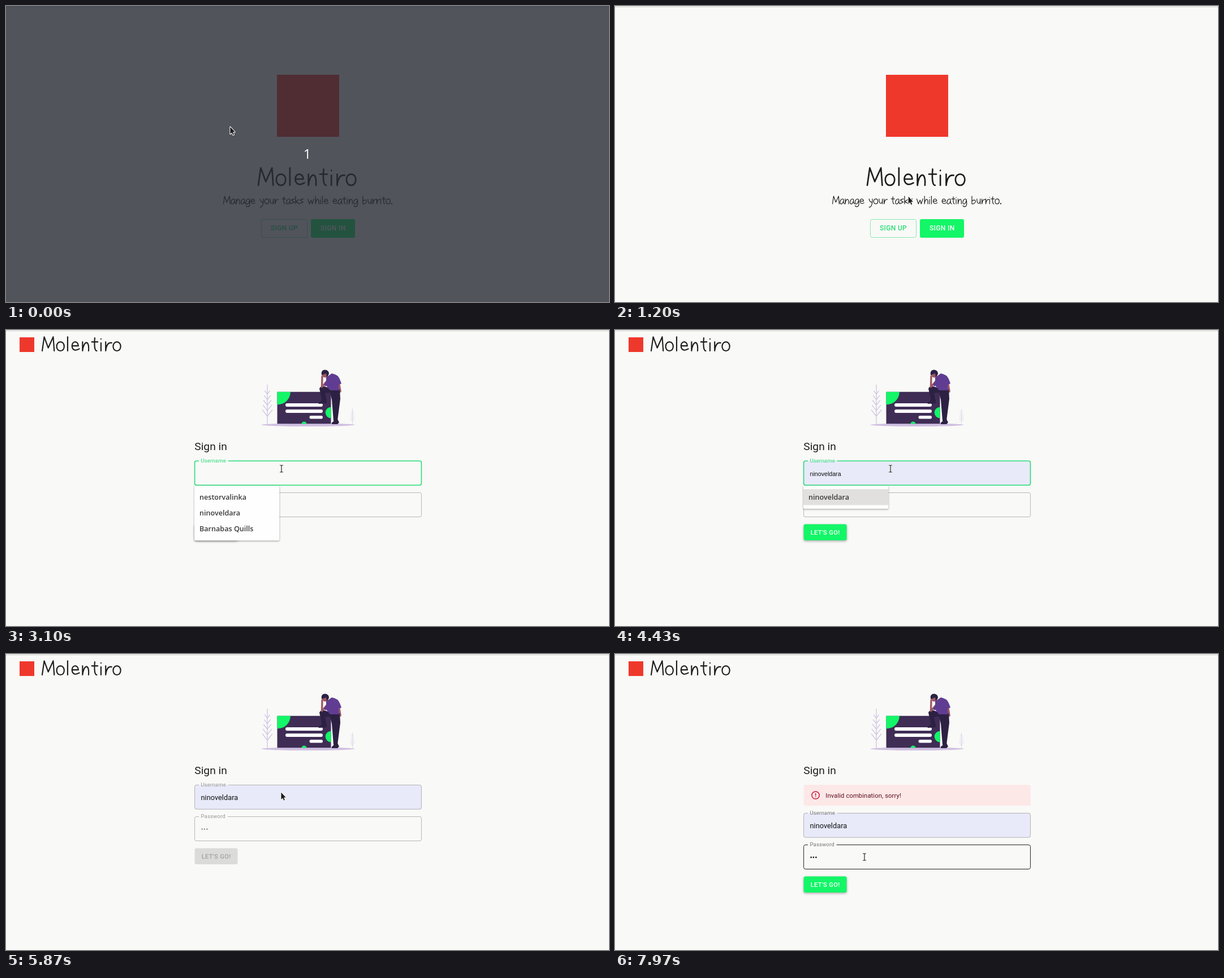
Write an HTML page with a canvas that moves like this. It is 1066 px wide and 525 px high and loops after 8000 ms.

```html
<!DOCTYPE html>
<html lang="en">
<head>
<meta charset="utf-8">
<title>Molentiro</title>
<style>
html, body { margin: 0; width: 100%; height: 100%; overflow: hidden; background: #f9f9f7; }
canvas { display: block; }
</style>
</head>
<body>
<canvas width="1066" height="525" aria-label="Molentiro sign-in demo"></canvas>
<script>
const LOOP = 8000, PAGE = '#f9f9f7', GREEN = '#13f667', FOCUS = '#2bdc78', RED = '#ef382c';
const APP = 'Molentiro', USER = 'ninoveldara';
const NAMES = ['nestorvalinka', USER, 'Barnabas Quills'];
const USER_KEYS = [3470, 3530, 3600, 3700, 3900], PASS_KEYS = [5030, 5100, 5270];
const SANS = 'Roboto, sans-serif', MENU = '"Open Sans", sans-serif';
const c = document.querySelector('canvas').getContext('2d');

const clamp = v => Math.max(0, Math.min(1, v));
const span = (t, a, b) => clamp((t - a) / (b - a));
const easeOut = p => 1 - (1 - p) ** 3;
const easeInOut = p => p * p * (3 - 2 * p);
const count = (keys, t) => keys.filter(k => k <= t).length;

function box(x, y, w, h, r, color, line) {
  c.beginPath();
  c.roundRect(x, y, w, h, r);
  if (color) { c.fillStyle = color; c.fill(); }
  if (line) { c.strokeStyle = line; c.lineWidth = 1; c.stroke(); }
}

function text(s, x, y, font, color, spacing = 0, align = 'left') {
  c.font = font;
  c.letterSpacing = spacing + 'px';
  c.textAlign = align;
  c.fillStyle = color;
  c.fillText(s, x, y);
}

function disc(x, y, r, color) {
  c.beginPath();
  c.arc(x, y, r, 0, 7);
  c.fillStyle = color;
  c.fill();
}

function shape(d, color) {
  c.fillStyle = color;
  c.fill(new Path2D(d));
}

function line(d, color, width) {
  c.strokeStyle = color;
  c.lineWidth = width;
  c.stroke(new Path2D(d));
}

function shadowed(draw, alpha, blur, dy) {
  c.save();
  c.shadowColor = `rgba(0,0,0,${alpha})`;
  c.shadowBlur = blur;
  c.shadowOffsetY = dy;
  draw();
  c.restore();
}

// Handwriting: single strokes on a baseline at 0
const bowl = 'M7-8C3-12-2-2 2 0C5 1 7-4 7-8', stem = 'M1-14V0', arch = 'C2-10 8-12 7 0';
const GLYPHS = {
  a: bowl + 'Q6-1 9 0', g: bowl + 'C8 0 8 5 4 5Q1 5 1 3',
  o: 'M4-9C-1-9-1 0 4 0C9 0 9-9 4-9', n: 'M1-9V0' + arch, h: stem + arch,
  e: 'M1-5H7C7-11-1-10 1-3Q3 1 8-2', y: 'M1-9Q2-3 6-3M7-9Q7 6 1 6',
  u: 'M1-9C1 2 7 2 7-9V0', r: 'M1-9V0Q2-9 7-8', t: 'M3-13Q2 0 5 0M0-9H6',
  s: 'M6-9Q-3-7 3-5T0-1', k: stem + 'M7-8L1-4Q5-3 8 0', l: stem,
  w: 'M0-9L3 0L6-7L8 0L11-9', i: 'M1-8V0M1-12V-11.8', b: stem + 'C10 1 9-12 1-5',
  M: 'M0 0L2-14L6-3L11-14L12 0', '.': 'M1-1H2V0H1Z'
};
const advance = ch => 'il.'.includes(ch) ? 3.5 : ' rts'.includes(ch) ? 7 : 'Mw'.includes(ch) ? 13 : 9;

function hand(s, x, y, size, gap) {
  c.save();
  c.translate(x, y);
  c.scale(size, size);
  c.lineCap = c.lineJoin = 'round';
  for (const ch of s) {
    if (GLYPHS[ch]) line(GLYPHS[ch], '#1d1d1d', 1.2);
    c.translate(advance(ch) + gap, 0);
  }
  c.restore();
}

function landing(overButton) {
  box(479, 122, 110, 110, 0, RED);
  hand(APP, 446, 318, 2.2, 1.2);
  hand('Manage your tasks while eating burrito.', 384.5, 351, .98, 0);
  const font = '500 12px ' + SANS;
  box(451.5, 378.5, 81, 32, 3.2, null, 'rgba(43,220,120,.55)');
  text('SIGN UP', 492, 398, font, FOCUS, .34, 'center');
  box(539, 378, 78, 33, 3.2, overButton ? '#0fd056' : GREEN);
  text('SIGN IN', 578.2, 398, font, '#fff', .34, 'center');
}

function plant(x, top, bottom, reach) {
  const h = bottom - top;
  let d = `M${x} ${top}V${bottom}`;
  for (let i = 1; i < 6; i++) {
    const y = top + h * (.1 + i * .14), w = reach * (.4 + i * .12);
    d += `M${x - w} ${y - w * 1.3}L${x} ${y}L${x + w} ${y - w * 1.3}`;
  }
  line(d, '#d2c3e4', reach / 7);
}

function illustration() {
  c.beginPath();
  c.ellipse(534, 168.3, 82.5, 2.8, 0, 0, 7);
  c.fillStyle = '#cfbfe0';
  c.fill();
  plant(462, 97, 167, 9);
  plant(612.5, 139, 168, 4);
  c.save();
  c.beginPath();
  c.rect(479.5, 109.7, 95, 56.5);
  c.clip();
  box(479, 109, 96, 58, 0, '#3f2d56');
  disc(480.5, 110, 22.3, GREEN);
  disc(574.5, 146.5, 9.8, GREEN);
  disc(527, 167, 4.6, GREEN);
  c.restore();
  box(494, 130, 66, 6, 3, '#fff');
  box(494, 141, 66, 6, 3, '#fff');
  box(536.5, 152, 23.5, 5.6, 2.8, '#fff');
  // Leaning figure
  c.lineCap = c.lineJoin = 'round';
  line('M588 91L591 109L586 112', '#9c5964', 3.6);
  shape('M572 103L590 105L591 122L586 161H579L576 124L573 111L564 112L567 126H559L554 104Q556 99 563 100Z', '#2c2142');
  shape('M559 122L567 125V130L553 131Q551 129 557 126ZM579 158H586L589 164L586 167H576Q574 165 580 161Z', '#2c2142');
  shape('M566 84L576 77Q587 79 590 87L593 95L588 97L589 107L573 107Q568 102 566 98Z', '#603d92');
  disc(564.5, 79, 5.4, '#9c5964');
  shape('M558 80Q556 71 564 70.5Q571 71 571 78L567 84L566 77Z', '#2c2142');
  line('M559 82L558.5 101L567 91', '#9c5964', 3.4);
  line('M565 97L569 90', '#603d92', 5);
}

function field(f, y) {
  const left = 333.6, right = 734.4, bottom = y + 43, r = 3.2;
  if (f.filled) box(left, y, right - left, 43, r, '#e8eaf9');
  c.font = '9.6px ' + SANS;
  c.letterSpacing = '.09px';
  const gap = (c.measureText(f.label).width + 7.5) * f.float, notch = 341;
  c.beginPath();
  c.moveTo(notch + gap, y);
  c.arcTo(right, y, right, bottom, r);
  c.arcTo(right, bottom, left, bottom, r);
  c.arcTo(left, bottom, left, y, r);
  c.arcTo(left, y, notch, y, r);
  c.lineTo(notch, y);
  c.strokeStyle = f.focus ? FOCUS : f.hover ? '#212121' : 'rgba(0,0,0,.3)';
  c.lineWidth = f.focus ? 1.6 : f.hover ? 1 : .9;
  c.lineCap = 'butt';
  c.stroke();

  const labelColor = f.focus ? FOCUS : f.disabled ? '#989897' : '#757574';
  text(f.label, 344.5, y + 25.4 - 22.6 * f.float, `${12.8 - 3.2 * f.float}px ${SANS}`, labelColor, .1);
  const font = f.preview ? '10.67px "Liberation Sans", Arial, sans-serif' : '12.8px ' + SANS;
  text(f.value, 344.5, y + 26.2, font, f.ink || '#111');
  if (f.caret) {
    c.fillStyle = '#111';
    c.fillRect(Math.round(345 + c.measureText(f.value).width), y + 14, 1, 15);
  }
}

function submitButton(y, off) {
  c.globalAlpha = 1 - off;
  shadowed(() => box(333.6, y, 76, 28.6, 3.2, GREEN), .35, 4, 1.5);
  c.globalAlpha = off;
  box(333.6, y, 76, 28.6, 3.2, '#dbdbd9');
  c.globalAlpha = 1;
  text("LET'S GO!", 371.6, y + 18.2, '500 11.2px ' + SANS, off > .5 ? '#a3a3a1' : '#fff', .32, 'center');
}

function menu(items, marked) {
  shadowed(() => box(333, 276, 150.3, 13 + 28.2 * items.length, 2, '#fefefe'), .4, 3, 1);
  if (marked) box(333, 282.3, 150.3, 28.2, 0, '#e1e0de');
  items.forEach((s, i) => text(s, 342, 301 + 28.2 * i, '600 12.6px ' + MENU, '#3b3b3b'));
}

function alertBar() {
  box(333.6, 232, 401, 37, 3.2, '#fce8e7');
  c.beginPath();
  c.arc(354.6, 250.5, 6.6, 0, 7);
  c.strokeStyle = '#cf1238';
  c.lineWidth = 1.5;
  c.stroke();
  c.fillStyle = '#cf1238';
  c.fillRect(353.9, 247, 1.5, 4.2);
  c.fillRect(353.9, 252.5, 1.5, 1.5);
  text('Invalid combination, sorry!', 372.3, 254.5, '11.2px ' + SANS, '#5c0d1c', .12);
}

function signIn(t, mouse) {
  box(24, 13, 26, 26, 0, RED);
  hand(APP, 64, 37, 1.77, 1.2);
  illustration();
  text('Sign in', 333.3, 213, '19.2px ' + SANS, '#1f1f1f');

  const failed = t >= 6800, dy = failed ? 50 : 0, disabled = t >= 5600 && !failed;
  const userY = 232.3 + dy, passY = 288.5 + dy;
  const over = y => !disabled && mouse.y >= y && mouse.y <= y + 43;
  const preview = t >= 4430 && t < 4670;
  const typed = USER.slice(0, count(USER_KEYS, t));
  if (failed) alertBar();

  field({
    label: 'Username', float: easeOut(span(t, 2500, 2700)),
    focus: t >= 2500 && t < 4800, hover: over(userY), disabled, preview,
    filled: t >= 4430, value: t >= 4430 ? USER : typed,
    caret: (t >= 2500 && t < 3020) || (t >= 3470 && t < 4400) || (t >= 4670 && t < 4800)
  }, userY);
  field({
    label: 'Password', float: easeOut(span(t, 4800, 5000)),
    focus: t >= 4800 && t < 5600, hover: over(passY), disabled,
    value: '•'.repeat(count(PASS_KEYS, t)), ink: disabled ? '#989897' : '#111',
    caret: t >= 4800 && t < 5600
  }, passY);
  submitButton(344.4 + dy, failed ? 1 - span(t, 6800, 7050) : span(t, 5600, 5850));
  if (t >= 2570 && t < 4670) menu(NAMES.filter(s => s.startsWith(typed)), preview);
  return over(userY) || over(passY);
}

function status() {
  box(-3, 508.5, 129.5, 20, 3, '#f1f0ee', '#c4c4c2');
  text('localhost:3000/sign-in', 3, 521, '11.6px ' + MENU, '#4c4c4c');
}

const POINTERS = {
  arrow: 'M-.6-.6V12L2.2 9.4L4.2 13.8L6 13L4 8.6H7.8Z',
  hand: 'M-1 0Q0-1.5 1 0V5L7 6.5Q8.5 7 8 9L6.5 14H0L-4 9Q-4-1 -3 7L-1 9Z'
};

function pointer(kind, { x, y }) {
  c.save();
  c.translate(x, y);
  c.lineJoin = 'round';
  if (kind === 'beam') {
    const beam = 'M-3-6H-1Q0-6 0-5V5Q0 6-1 6H-3M3-6H1Q0-6 0-5M0 5Q0 6 1 6H3';
    line(beam, '#fff', 2.4);
    line(beam, '#222', 1.2);
  } else {
    line(POINTERS[kind], kind === 'hand' ? '#222' : '#fff', 2);
    shape(POINTERS[kind], kind === 'hand' ? '#fff' : '#1c1c1c');
  }
  c.restore();
}

// Stops and the moves that lead to the next one
const STOPS = [[397, 215], [581, 401], [487, 246], [441, 360]];
const MOVES = [[730, 1500], [2030, 2330], [7730, 7970]];

function mouseAt(t) {
  let [x, y] = STOPS[0];
  MOVES.forEach(([a, b], i) => {
    const p = easeInOut(span(t, a, b)), from = STOPS[i], to = STOPS[i + 1];
    x += (to[0] - from[0]) * p;
    y += (to[1] - from[1]) * p;
  });
  return { x, y };
}

function render(t) {
  const mouse = mouseAt(t);
  let kind = 'arrow';
  c.fillStyle = PAGE;
  c.fillRect(0, 0, 1066, 525);
  c.fillStyle = '#c9c9c8';
  c.fillRect(0, 1, 1066, 1);
  if (t < 1730) {
    const over = mouse.x > 539 && mouse.y > 378;
    landing(over);
    if (over) kind = 'hand';
  } else if (signIn(t, mouse)) kind = 'beam';
  if (t >= 1430 && t < 2100) status();
  if (t < 30) {
    c.fillStyle = 'rgba(39,43,53,.8)';
    c.fillRect(0, 0, 1066, 525);
    text('1', 532.5, 271, '500 24px ' + MENU, '#fff', 0, 'center');
  }
  pointer(kind, mouse);
}

(function tick() {
  render(performance.now() % LOOP);
  requestAnimationFrame(tick);
})();
</script>
</body>
</html>
```
